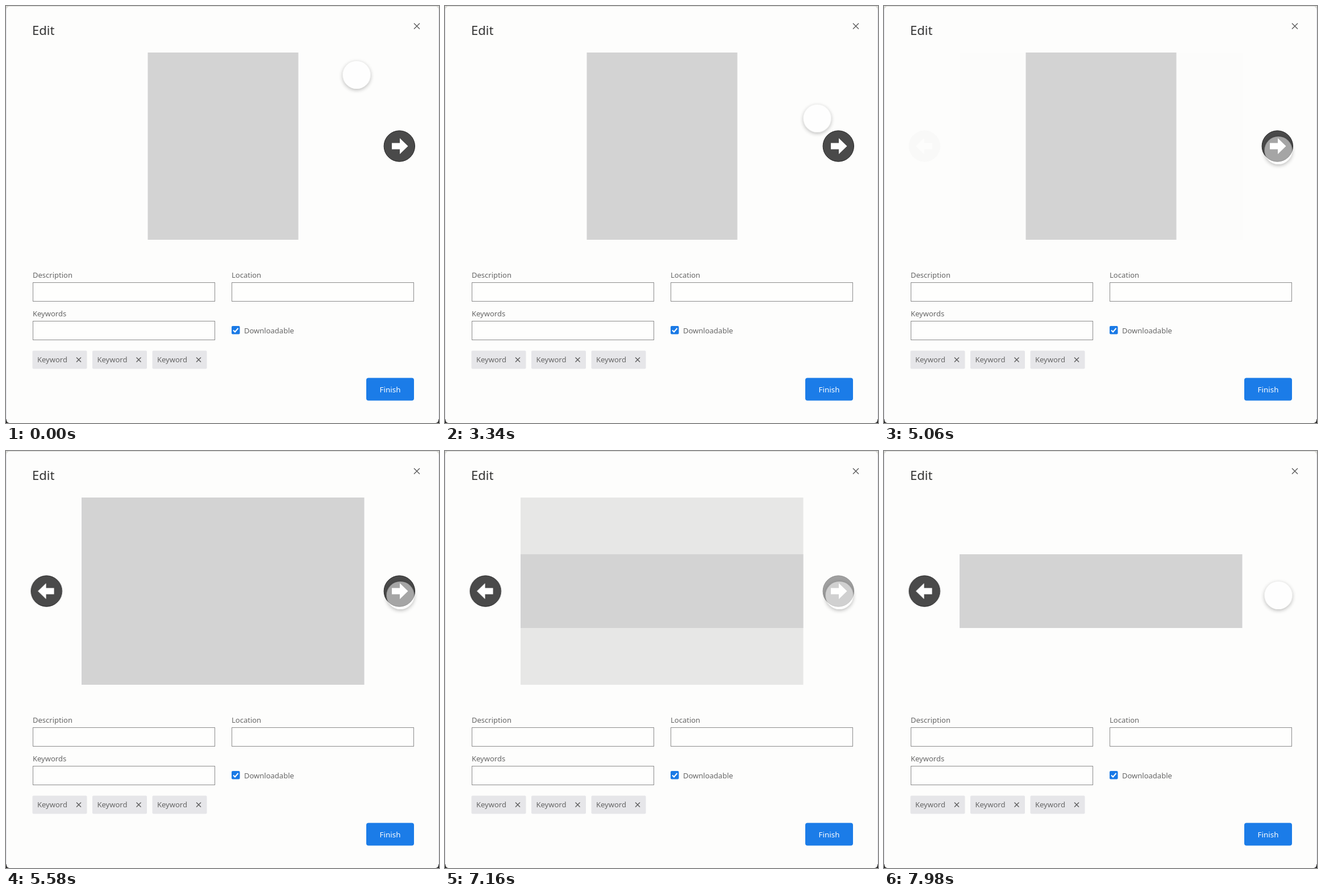
Animation of 762x735 px, one loop 8000 ms. Source, as an HTML page:

```html
<!DOCTYPE html>
<html lang="en">
<head>
<meta charset="utf-8">
<title>Edit dialog</title>
<style>
  html, body { margin: 0; width: 100%; height: 100%; overflow: hidden; }
  body { background: linear-gradient(#dadad6 6px, #e2e2ea 7px, #e2e2ea 728px, #222 729px); }
  #stage { position: absolute; left: 0; top: 0; width: 762px; height: 735px; overflow: hidden; }
  #panel { position: absolute; inset: 1px 1px 0; border-radius: 5px; background: #fdfdfc; }
  svg { position: absolute; left: 0; top: 0; }
  text { font: 13px "Noto Sans", "Open Sans", sans-serif; fill: #666; }
  .title { font-size: 22px; fill: #333; }
  .action { font-size: 13.4px; fill: #fff; }
  .field { fill: #fefefd; stroke: #8c8c8c; }
  .photo { fill: #d3d3d3; }
  .cross { fill: none; stroke: #5c5c5c; stroke-width: 1.4; }
  #cursor {
    position: absolute; left: -24.5px; top: -24.5px; width: 49px; height: 49px;
    border-radius: 50%; background: rgba(255, 255, 255, .5);
    box-shadow: 0 2px 7px rgba(0, 0, 0, .28);
  }
</style>
</head>
<body>
<div id="stage">
  <div id="panel"></div>
  <svg width="762" height="735" viewBox="0 0 762 735">
    <defs>
      <g id="arrow">
        <circle cx="692.3" cy="247" r="27.2" fill="#4a4a4a" stroke="#262626"/>
        <path d="M679 241.5H693V233L707.5 247L693 261V252.5H679Z" fill="#fff"/>
      </g>
      <g id="tag">
        <rect x="46.5" y="607.5" width="96" height="32" rx="2" fill="#e6e6e9"/>
        <text x="55" y="627.5">Keyword</text>
        <path class="cross" d="M124 619.5l8 8m0-8l-8 8"/>
      </g>
    </defs>

    <text class="title" x="46" y="50.5">Edit</text>
    <path class="cross" d="M718 30.5l10 10m0-10l-10 10"/>

    <rect id="portrait" class="photo" x="249.5" y="82" width="265" height="330"/>
    <rect id="strip" class="photo" x="133" y="182" width="497.5" height="130"/>
    <rect id="wide" class="photo" x="133" y="82" width="497.5" height="330"/>
    <use id="next" href="#arrow"/>
    <g id="prev"><use href="#arrow" transform="translate(763.6) scale(-1 1)"/></g>

    <text x="47" y="479">Description</text>
    <text x="397" y="479">Location</text>
    <text x="47" y="547">Keywords</text>
    <rect class="field" x="47.5" y="487.5" width="320" height="33"/>
    <rect class="field" x="397.5" y="487.5" width="320" height="33"/>
    <rect class="field" x="47.5" y="555.5" width="320" height="33"/>

    <rect x="397" y="564" width="14.5" height="14.5" rx="2" fill="#1a7ae6"/>
    <path d="M400 571.5l3 3 5.5-6.5" fill="none" stroke="#fff" stroke-width="2"/>
    <text x="419" y="577">Downloadable</text>

    <use href="#tag"/>
    <use href="#tag" x="105.5"/>
    <use href="#tag" x="211"/>

    <rect x="634" y="655.5" width="84" height="40" rx="4" fill="#1b7ce8"/>
    <text class="action" x="676" y="681" text-anchor="middle">Finish</text>
  </svg>
  <div id="cursor"></div>
</div>
<script>
  const LOOP = 8000;

  // Each step: [time in ms, value, easing towards the next step]
  function play(id, prop, steps, format = v => v) {
    const all = [[0, steps[0][1]], ...steps, [LOOP, steps[steps.length - 1][1]]];
    const frames = all.map(([time, value, easing = "linear"]) =>
      ({ offset: time / LOOP, [prop]: format(value), easing }));
    document.getElementById(id).animate(frames, { duration: LOOP, iterations: Infinity });
  }

  const fadeIn = [[5050, 0], [5570, 1]];
  const fadeOut = [[6910, 1], [7430, 0]];

  play("prev", "opacity", fadeIn);
  play("next", "opacity", fadeOut);
  play("wide", "opacity", [...fadeIn, ...fadeOut]);

  // Swapped while the wide picture covers both
  play("portrait", "opacity", [[6200, 1], [6200, 0]]);
  play("strip", "opacity", [[6200, 0], [6200, 1]]);

  play("cursor", "transform", [
    [2520, [616.5, 121], "cubic-bezier(.4, 0, .75, .75)"],
    [3340, [654.5, 197.5], "cubic-bezier(.33, .46, .67, .9)"],
    [4180, [685, 249], "cubic-bezier(.3, .4, .5, 1)"],
    [4760, [693.5, 254]]
  ], ([x, y]) => `translate(${x}px, ${y}px)`);
</script>
</body>
</html>
```
